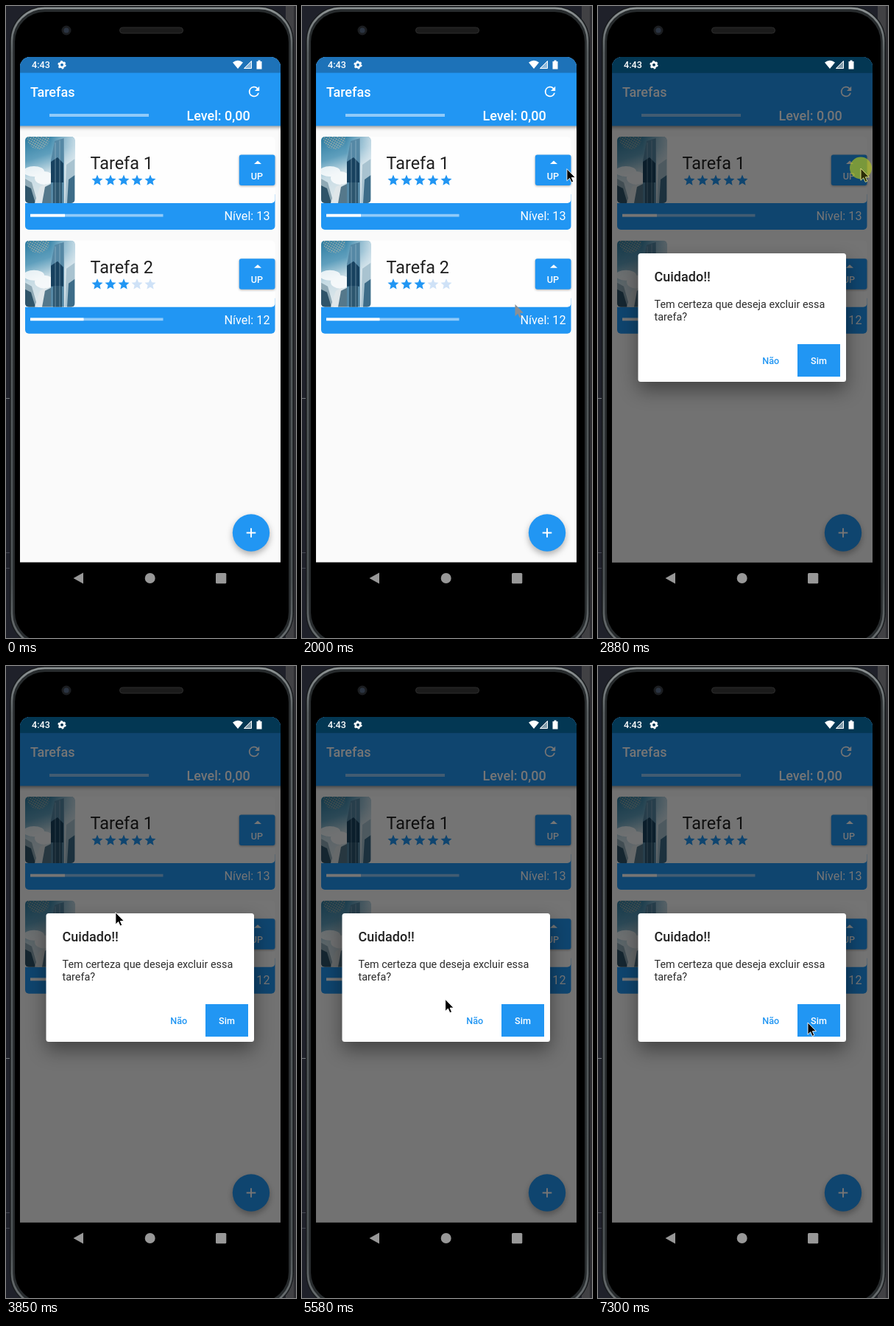
Animation of 394x856 px, one loop 8 s. Source, as an HTML page:

```html
<!DOCTYPE html>
<html lang="pt">
<head>
<meta charset="utf-8">
<title>Tarefas</title>
<style>
html, body { margin: 0; width: 100%; height: 100%; overflow: hidden; background: #1f212a; }
svg { display: block; width: 394px; height: 856px; font-family: Roboto, sans-serif; }
.blue { fill: #2196f3; }
.white { fill: #fff; }
.track { fill: #fff; opacity: .5; }
.off { fill: #cfe2f7; }
.medium { font-weight: 500; }
.head { font-size: 18px; font-weight: 500; }
.name { font-size: 23.4px; fill: #212121; }
.level { font-size: 16.2px; fill: #fff; text-anchor: end; }
.button { font-size: 12.6px; font-weight: 500; text-anchor: middle; }
.body { font-size: 14.4px; fill: #2c2c2c; }
.low { filter: drop-shadow(0 1.5px 1.5px rgba(0,0,0,.32)); }
.bar { filter: drop-shadow(0 2px 2.5px rgba(0,0,0,.4)); }
.high { filter: drop-shadow(0 4px 4px rgba(0,0,0,.3)); }
.modal { filter: drop-shadow(0 11px 13px rgba(0,0,0,.42)); }
.edge { fill: none; }
</style>
</head>
<body>
<svg viewBox="0 0 394 856">
  <defs>
    <linearGradient id="sky" x1="0" y1="0" x2=".25" y2="1">
      <stop offset="0" stop-color="#2b7ba0"/>
      <stop offset=".35" stop-color="#5f9fbd"/>
      <stop offset=".6" stop-color="#c6dbe4"/>
      <stop offset="1" stop-color="#e2e9ec"/>
    </linearGradient>
    <linearGradient id="haze">
      <stop offset=".5" stop-color="#dfeaf0" stop-opacity="0"/>
      <stop offset="1" stop-color="#dfeaf0" stop-opacity=".8"/>
    </linearGradient>
    <linearGradient id="metal" x1="0" y1="0" x2="0" y2="1">
      <stop offset="0" stop-color="#8d9394"/>
      <stop offset=".07" stop-color="#5a6062"/>
      <stop offset=".9" stop-color="#4c5254"/>
      <stop offset="1" stop-color="#6c7173"/>
    </linearGradient>
    <pattern id="dots" width="3" height="3" patternUnits="userSpaceOnUse" patternTransform="rotate(30)">
      <circle cx="1.5" cy="1.5" r=".8" fill="#d3c1a6"/>
    </pattern>
    <clipPath id="screen"><path d="M19 753.500V83a14 14 0 0 1 14-14H359a14 14 0 0 1 14 14V753.500z"/></clipPath>
    <clipPath id="thumb"><rect width="67.500" height="90" rx="5"/></clipPath>
    <clipPath id="upClip"><rect x="316.800" y="201.500" width="48.700" height="41.500" rx="3"/></clipPath>
    <path id="star" d="M12 17.270 18.180 21l-1.640-7.030L22 9.240l-7.190-.61L12 2 9.190 8.630 2 9.240l5.460 4.730L5.820 21z"/>
    <path id="arrow" d="M0 0V16.200L3.700 12.700 6.200 18.300 8.800 17.200 6.400 11.700H11.400z"/>

    <g id="photo" clip-path="url(#thumb)">
      <rect width="68" height="90" fill="url(#sky)"/>
      <rect width="68" height="90" fill="url(#haze)"/>
      <circle cx="18" cy="2" r="15" fill="url(#dots)"/>
      <g fill="#fff" opacity=".8">
        <ellipse cx="12" cy="47" rx="14" ry="7"/>
        <ellipse cx="26" cy="56" rx="13" ry="9"/>
      </g>
      <path d="M0 57 9 62 17 90H0z" fill="#8fa9b5"/>
      <path d="M0 66 8 70 14 90H0z" fill="#2f5469"/>
      <path d="M13 90 20 68 28 64 30 90z" fill="#dfe6e9"/>
      <path d="M23 90 27 68 35 64V90z" fill="#55788b"/>
      <path d="M35 90V32L40 6 53 2V90z" fill="#5588a5"/>
      <path d="M35 62V34L44 28 52 36V62z" fill="#17415f"/>
      <path d="M38 90V62H50V90z" fill="#2c566f"/>
      <path d="M54 90 56 38 67.500 30V90z" fill="#a9c3d0"/>
      <path d="M57 90 59 58 67.500 52V90z" fill="#3d6c88"/>
      <path d="M41 8V90M47 5V90M53 2V90" stroke="#b4ccd8" stroke-width=".7" opacity=".7"/>
    </g>

    <g id="card">
      <path d="M26 255H365.500V298a5 5 0 0 1-5 5H31a5 5 0 0 1-5-5z" class="blue"/>
      <path d="M26 267V182a5 5 0 0 1 5-5H360.500a5 5 0 0 1 5 5V262a5 5 0 0 1-5 5z" fill="#fefefe"/>
      <use href="#photo" x="26" y="177"/>
      <rect x="33" y="281.800" width="180.500" height="3.700" class="track"/>
    </g>
    <rect id="up" x="316.800" y="201.500" width="48.700" height="41.500" rx="3" class="blue"/>
    <g id="upLabel" class="white">
      <path d="M337 214 342 209.500 347 214z"/>
      <text x="341" y="234.500" class="button">UP</text>
    </g>
  </defs>

  <!-- device -->
  <path d="M380 0H394V60H380zM380 800H394V856H380z" fill="#414144"/>
  <path d="M391 0H394V856H391z" fill="#2d2d31"/>
  <path d="M0 531.500H6" stroke="#777b80"/>
  <path d="M0 740.500H6M0 761.500H6" stroke="#454852"/>
  <rect x="5.500" y=".5" width="385" height="869" rx="47" fill="#272b2d" stroke="#15171a"/>
  <rect x="8" y="3" width="380" height="864" rx="44.500" class="edge" stroke="url(#metal)" stroke-width="2.500"/>
  <rect x="12" y="8" width="372" height="854" rx="41" fill="#000"/>
  <circle cx="82" cy="33" r="6.500" fill="#1b1d20"/>
  <circle cx="82" cy="33" r="3.500" fill="#2b3442"/>
  <rect x="154.500" y="29" width="86" height="8" rx="4" fill="#1b1b1b" stroke="#2d2d2d"/>

  <!-- app -->
  <g clip-path="url(#screen)">
    <rect x="19" y="69" width="354" height="685" fill="#fafafa"/>
    <rect x="10" y="69" width="372" height="93.400" class="blue bar"/>
    <rect x="19" y="69" width="354" height="21.500" fill="#1d72b8"/>
    <g class="white head">
      <text x="33" y="123">Tarefas</text>
      <text x="245.500" y="155">Level: 0,00</text>
      <path transform="translate(326.200 105.200) scale(.9)" d="M17.650 6.350A8 8 0 1 0 19.730 14H17.650A6 6 0 1 1 12 6C13.660 6 15.140 6.690 16.220 7.780L13 11H20V4z"/>
    </g>
    <rect x="59" y="146" width="135" height="4" class="track"/>

    <use href="#card"/>
    <rect x="33" y="281.800" width="47" height="3.700" class="white"/>
    <text x="114.600" y="221" class="name">Tarefa 1</text>
    <text x="358.500" y="290" class="level">Nível: 13</text>
    <g id="stars1"></g>
    <use id="upShape" href="#up" class="low"/>
    <g id="press" clip-path="url(#upClip)">
      <rect x="316" y="201" width="50" height="43" fill="#fff" opacity=".24"/>
      <circle id="ripple" cx="357" cy="220" fill="#fff" opacity=".24"/>
    </g>
    <use href="#upLabel"/>

    <g transform="translate(0 140.700)">
      <use href="#card"/>
      <rect x="33" y="281.800" width="72.500" height="3.700" class="white"/>
      <text x="114.600" y="221" class="name">Tarefa 2</text>
      <text x="358.500" y="290" class="level">Nível: 12</text>
      <g id="stars2"></g>
      <use href="#up" class="low"/>
      <use href="#upLabel"/>
    </g>

    <circle cx="333" cy="713.500" r="25.200" class="blue high"/>
    <path d="M326.700 713.500H339.300M333 707.200V719.800" stroke="#fff" stroke-width="1.900"/>
    <use id="ghost" href="#arrow" x="289.500" y="404" fill="#8b8f94"/>

    <g id="dialog">
      <rect x="19" y="69" width="354" height="685" opacity=".54"/>
      <rect x="19" y="69" width="354" height="21.500" fill="#033753"/>
      <rect x="54.500" y="335" width="282.500" height="174" rx="3.500" class="white modal"/>
      <text x="76.500" y="373" class="head" fill="#212121">Cuidado!!</text>
      <text class="body"><tspan x="76.500" y="408.500">Tem certeza que deseja excluir essa</tspan><tspan x="76.500" y="425.500">tarefa?</tspan></text>
      <text x="234.800" y="484.500" class="button blue">Não</text>
      <rect x="271" y="458" width="58" height="44" class="blue"/>
      <text x="300" y="484.500" class="button white">Sim</text>
    </g>

    <!-- status bar -->
    <g class="white">
      <text x="35" y="84.300" class="medium" font-size="12.600">4:43</text>
      <circle cx="76" cy="79.700" r="3.300" class="edge" stroke="#fff" stroke-width="2.600"/>
      <circle cx="76" cy="79.700" r="4.700" class="edge" stroke="#fff" stroke-width="2" stroke-dasharray="2.460"/>
      <path d="M308 76.500Q315 71 322 76.500L315 85z"/>
      <path d="M323 84.500 333 74.500V84.500z" opacity=".5"/>
      <path d="M323.500 84.500H333.500V74.500z" class="edge" stroke="#fff"/>
      <path d="M340.500 75H342.500V73.500H345.500V75H347.500V85.500H340.500z"/>
    </g>
  </g>

  <!-- navigation -->
  <g fill="#989898">
    <path d="M91.500 775 105 767.500V782.500z"/>
    <circle cx="195.700" cy="775" r="7"/>
    <rect x="285" y="768" width="14.300" height="14.300" rx="1.500"/>
  </g>

  <circle id="tap" cx="357" cy="219.500" r="15" fill="#bccb1c" opacity=".62"/>
  <use id="cursor" href="#arrow" fill="#000" stroke="#fff" stroke-width=".9"/>
</svg>
<script>
const LOOP = 8000;
const PRESS = 2410, OPEN = 2880, RELEASE = 3220;
const $ = id => document.getElementById(id);

// time, x, y of the pointer tip
const path = [
  [70, 344, 842], [350, 326, 640], [560, 289, 404], [700, 287, 300],
  [820, 300, 262], [890, 290, 272], [1030, 212, 345], [1170, 183, 374],
  [1300, 238, 391], [1500, 330, 285], [1660, 366, 224], [1730, 366, 222],
  [2130, 357, 220], [3150, 357, 220], [3600, 230, 290], [3990, 104, 358],
  [4300, 91, 367], [4750, 152, 379], [4880, 152, 380], [4950, 154, 390],
  [5710, 203, 464], [5850, 210, 451], [6260, 230, 489], [6390, 230, 489],
  [6800, 255, 493], [7230, 282, 483], [7300, 285, 483], [LOOP, 285, 483]
];

function drawStars(group, lit) {
  for (let i = 0; i < 5; i++) {
    const star = document.createElementNS(group.namespaceURI, "use");
    star.setAttribute("href", "#star");
    star.setAttribute("class", i < lit ? "blue" : "off");
    star.setAttribute("transform", `translate(${115 + 18 * i} 227) scale(.75)`);
    group.append(star);
  }
}

function show(id, on) {
  $(id).style.display = on ? "" : "none";
}

function pointAt(t) {
  const i = Math.max(1, path.findIndex(p => p[0] >= t));
  const [t0, x0, y0] = path[i - 1], [t1, x1, y1] = path[i];
  const k = Math.max(0, (t - t0) / (t1 - t0));
  return [x0 + (x1 - x0) * k, y0 + (y1 - y0) * k];
}

function render(t) {
  const pressed = t >= PRESS && t < OPEN;
  const tapping = t >= PRESS && t < RELEASE;
  show("press", pressed);
  show("tap", tapping);
  show("ghost", t >= 630 && t < OPEN);
  show("dialog", t >= OPEN);
  show("cursor", t >= path[0][0]);
  $("upShape").setAttribute("class", pressed ? "high" : "low");
  $("ripple").setAttribute("r", 5 + 32 * Math.min(1, Math.max(0, (t - PRESS) / 340)));
  const [x, y] = pointAt(t);
  $("cursor").setAttribute("transform", `translate(${x.toFixed(1)} ${y.toFixed(1)})`);
  $("cursor").setAttribute("stroke", tapping ? "#e9ea8a" : "#fff");
  $("cursor").setAttribute("fill", tapping ? "#2b2e08" : "#000");
}

drawStars($("stars1"), 5);
drawStars($("stars2"), 3);

const start = performance.now();
function frame() {
  render((performance.now() - start) % LOOP);
  requestAnimationFrame(frame);
}
frame();
</script>
</body>
</html>
```
